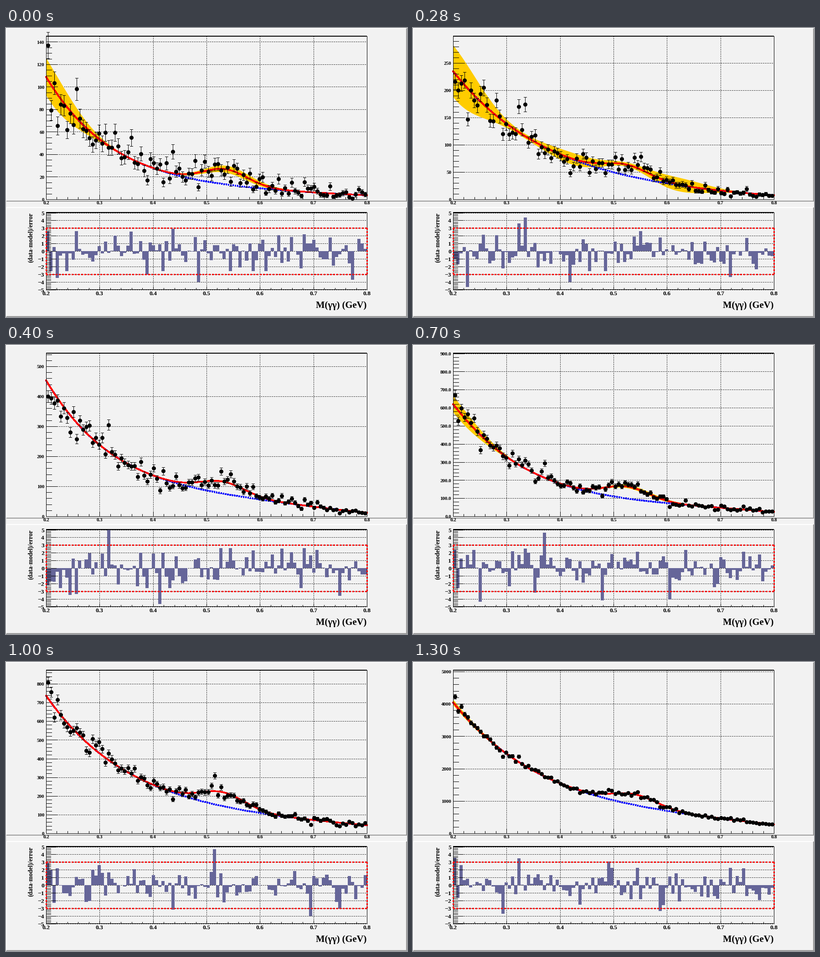
Animation, 880 px wide and 636 px high, one loop 1.6 s. Source, as a matplotlib script:

```python
import numpy as np
import matplotlib.pyplot as plt
from matplotlib.animation import FuncAnimation

W, H, DPI = 880, 636, 80
PX = 72 / DPI                              # points per pixel
LEFT, RIGHT = 88, 792
TOP, BASE = 18, 377                        # fit panel
P_TOP, P_MID, P_BASE = 406, 491, 575       # pull panel
P_UNIT = 16.9
BINS = 100
BG, PULL, BAND = "#f2f2f2", "#666699", "#ffcc00"
DOTTED = (0.5, (1, 2))
DASHED = (1 / 6, (1, 1))

fig = plt.figure(figsize=(W / DPI, H / DPI), dpi=DPI, facecolor=BG)
ax = fig.add_axes([0, 0, 1, 1])
ax.set(xlim=(0, W), ylim=(H, 0))
ax.axis("off")


def px(mass):
    return LEFT + (np.asarray(mass) - 0.2) / 0.6 * (RIGHT - LEFT)


def hlines(y, x0, x1, color="black", width=1, z=1, style="solid"):
    return ax.hlines(y, x0, x1, colors=color, linewidths=width * PX,
                     linestyles=style, zorder=z, antialiased=False)


def vlines(x, y0, y1, color="black", width=1, z=1, style="solid"):
    return ax.vlines(x, y0, y1, colors=color, linewidths=width * PX,
                     linestyles=style, zorder=z, antialiased=False)


def curve(x, y, color, z, style="solid"):
    return ax.plot(x, y + 0.5, color=color, lw=2.7 * PX, ls=style, zorder=z,
                   antialiased=False, dash_capstyle="butt")[0]


def fill(x, y0, y1, color, step=None):
    return ax.fill_between(x, y0, y1, color=color, lw=0, zorder=2, step=step,
                           antialiased=False)


def label(x, y, s, size, ha="right", **kw):
    return ax.text(x, y, s, fontsize=size * PX, family="Liberation Serif",
                   weight="bold", ha=ha, va="baseline", zorder=10, **kw)


def number(x, mid, s, size, ha="right"):
    return label(x, mid + 0.5 + 0.338 * size, s, size, ha)


def bevel(y0, y1):
    hlines(y0 + 1, 0, W, "white", 2)
    vlines(1, y0, y1, "white", 2)
    hlines(y1, 1, W, "#999999", 2)
    vlines(W - 1, y0 + 1, y1, "#999999", 2)


def panel(top, base, tick, label_y, size):
    major = px(np.arange(2, 9) / 10)
    vlines(major[1:-1], top, base, style=DOTTED)
    vlines(major, base - 2 * tick, base, z=8)
    vlines(px(np.linspace(0.2, 0.8, 31)), base - tick, base, z=8)
    vlines([LEFT, RIGHT], top, base, z=8)
    hlines(base, LEFT, RIGHT, z=8)
    hlines(top, LEFT, RIGHT, width=2, z=8)
    for i, x in enumerate(major):
        number(x, label_y, f"0.{i + 2}", size, "center")


def static_parts():
    bevel(0, 381)
    bevel(394, 635)
    panel(TOP, BASE, 5, 384, 11)
    panel(P_TOP, P_BASE, 3, 583, 13.5)
    for v in range(-5, 6):
        y = P_MID - v * P_UNIT
        hlines(y, LEFT, RIGHT, style=DOTTED)
        hlines(y, LEFT, LEFT + 22, z=4)
        number(84, y, str(v).replace("-", "\u2212"), 13.5)
    hlines(P_MID - P_UNIT * np.linspace(-5, 5, 51), LEFT, LEFT + 10, z=4)
    lo, hi = P_MID - 3 * P_UNIT, P_MID + 3 * P_UNIT
    hlines([lo, hi], LEFT, RIGHT, "red", 3, 9, DASHED)
    vlines([LEFT, RIGHT], lo, hi, "red", 3, 9, DASHED)
    label(58, 461, "(data-model)/error", 13.6, "center",
          rotation=90, rotation_mode="anchor")
    label(791.5, 616, "M(γγ) (GeV)", 20.6)


def tick_step(top):
    """Smallest 1-2-5 step that gives at most ten intervals."""
    for power in (1, 10, 100, 1000):
        for lead in (1, 2, 5):
            if top / (lead * power) <= 10:
                return lead * power, 4 if lead == 2 else 5


def gauss(x, mean, sigma):
    return np.exp(-0.5 * ((x - mean) / sigma) ** 2)


def scene(seed, top, background, peak, edge=0, lobes=(), outliers=()):
    """Artists of one fit.

    background: counts at 0.2, 0.3, 0.4, 0.6, 0.8; peak: height and centre;
    edge, lobes: half width of the error band in pixels.
    """
    log_bkg = np.polyfit([-3, -2, -1, 1, 3], np.log(background), 4)
    height, mean = peak

    def bkg(m):
        return np.exp(np.polyval(log_bkg, (m - 0.5) * 10))

    def model(m):
        return bkg(m) + height * gauss(m, mean, 0.042)

    def py(n):
        return BASE - n * (BASE - TOP) / top

    step, div = tick_step(top)
    ticks = np.arange(0, top, step)
    art = [hlines(py(ticks[1:]), LEFT, RIGHT, style=DOTTED),
           hlines(py(ticks), LEFT, LEFT + 25, z=3),
           hlines(py(np.arange(0, top, step / div)), LEFT, LEFT + 12, z=3)]
    art += [number(84, py(t), str(t), 11) for t in ticks]

    m = np.linspace(0.2, 0.8, 240)
    x, y = px(m), py(model(m))
    half = 1 + edge * gauss(m, 0.2, 0.05)
    for centre, size in lobes:
        half += size * gauss(m, centre, 0.05)
    art += [fill(x, y - half, np.minimum(y + half, BASE), BAND),
            curve(x, py(bkg(m)), "blue", 4, DASHED),
            curve(x, y, "red", 5)]

    rng = np.random.default_rng(seed)
    pull = np.clip(rng.normal(0, 1.3, BINS), -2.6, 2.6)
    for i, p in outliers:
        pull[i] = p
    mid = 0.2 + 0.6 * (np.arange(BINS) + 0.5) / BINS
    # solves pull = (n - model) / sqrt(n)
    err = (pull + np.sqrt(pull ** 2 + 4 * model(mid))) / 2
    n = err ** 2
    cx = np.round(px(mid))
    lo, hi = py(n - err), py(n + err)
    art.append(vlines(cx, np.minimum(lo, BASE), hi, z=6))
    art += [hlines(end, cx - 3, cx + 3, z=6) for end in (lo, hi)]
    art += ax.plot(cx, py(n), "o", color="black", ms=9 * PX, mew=0, zorder=7)

    bars = np.clip(np.append(pull, pull[-1]), -5, 5)
    art.append(fill(np.linspace(LEFT, RIGHT, BINS + 1), P_MID,
                    P_MID - bars * P_UNIT, PULL, "post"))
    return art


static_parts()
scenes = [
    scene(3, 145, [109, 53.5, 28, 10, 3.8], (13.5, 0.535), 40, [(0.55, 7)],
          [(3, -3.5), (31, -3.1), (39, 2.9), (47, -4), (95, -3.7)]),
    scene(5, 299, [235, 139, 83, 29.6, 8], (20, 0.525), 56,
          [(0.42, 12), (0.62, 14)],
          [(4, -4.7), (20, 3.6), (22, 4.4), (36, -4), (86, -3.4)]),
    scene(8, 544, [454, 239, 137, 57, 13], (40, 0.53), 2, [(0.53, 1)],
          [(7, -3.5), (9, -3.4), (19, 5.1), (35, -4.7), (91, -3.6)]),
    scene(13, 901.5, [621, 330, 182, 74, 26], (66, 0.525), 17, [(0.55, 3)],
          [(8, -4.4), (25, -3.2), (28, 4.6), (46, -4.2), (67, -4.1)]),
    scene(21, 873, [738, 429, 261, 110, 45], (75, 0.53), 0, [],
          [(0, 2.9), (39, -3.2), (52, 4.7), (82, -4), (91, -3.1)]),
    scene(34, 5042, [4052, 2465, 1552, 702, 281], (330, 0.54), 5, [],
          [(0, 3.6), (15, -3.7), (20, 3.5), (48, 3.1), (64, -3.4)]),
]


def update(k):
    # the first fit stays 100 ms, each later one 300 ms
    current = (k + 2) // 3
    for i, art in enumerate(scenes):
        for a in art:
            a.set_visible(i == current)
    return []


anim = FuncAnimation(fig, update, frames=16, interval=100, repeat=True,
                     repeat_delay=0, blit=False)
plt.show()
```
